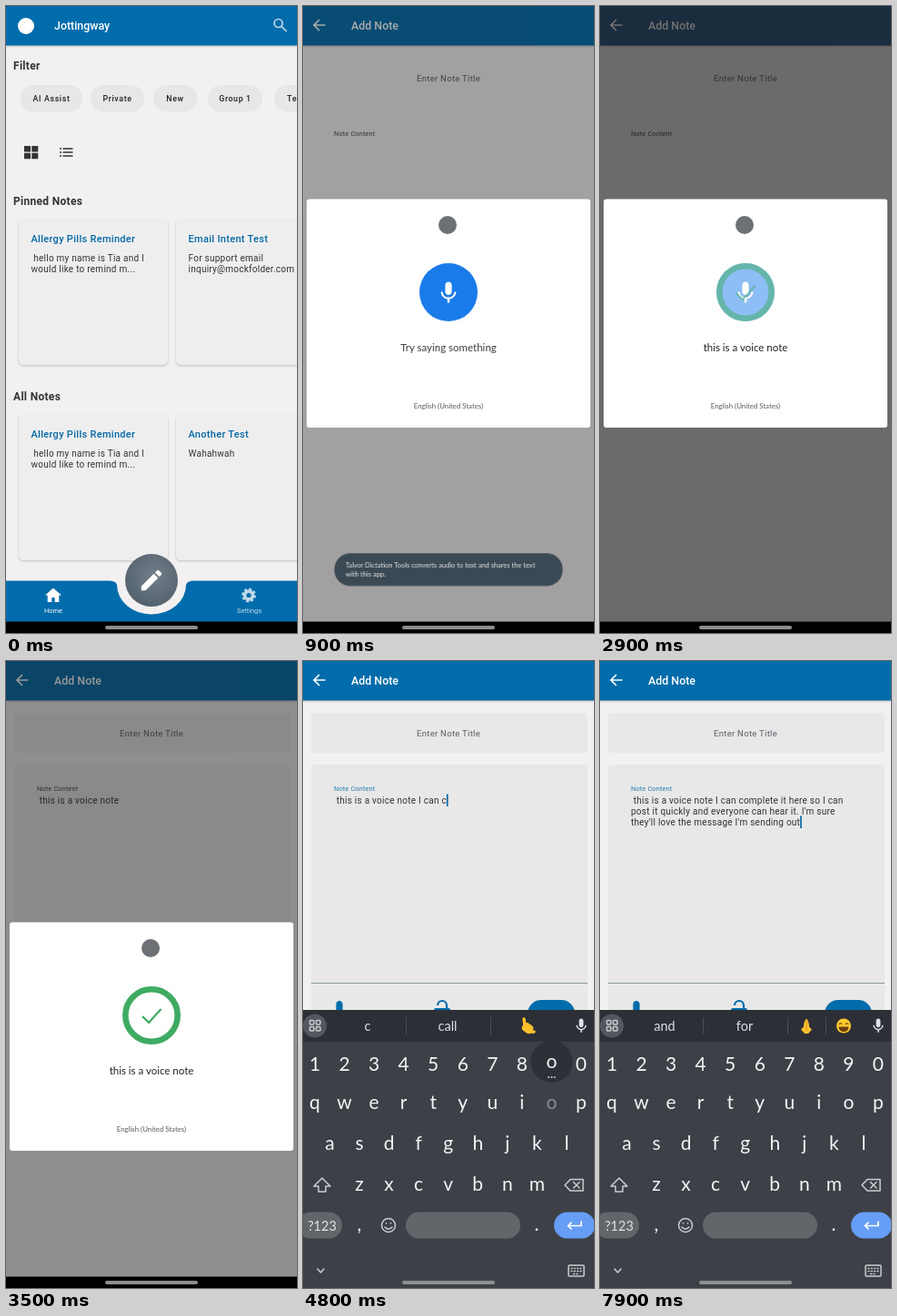
Recreate the animation shown at these times as an HTML page. Size 320x690 px, loop 8 s.

```html
<!DOCTYPE html>
<html lang="en">
<head>
<meta charset="utf-8">
<title>Voice note</title>
<style>
html, body { margin: 0; width: 100%; height: 100%; overflow: hidden; background: #000; }
svg { display: block; width: 100vw; height: 100vh; font-family: Roboto, sans-serif; }
text { white-space: pre; }
.mid { text-anchor: middle; }
.top { fill: #016cab; filter: drop-shadow(0 1px 1px rgba(0,0,0,.2)); }
.bar { font-size: 12.4px; font-weight: 500; fill: #fff; }
.head { font-size: 12px; font-weight: 700; letter-spacing: .3px; fill: #333; }
.chip { font-size: 8.8px; font-weight: 500; letter-spacing: .65px; fill: #222; text-anchor: middle; }
.name { font-size: 11px; font-weight: 500; letter-spacing: .3px; fill: #0569a8; }
.body { font-size: 10px; letter-spacing: .25px; fill: #333; }
.tab { font-size: 7.4px; fill: #fff; text-anchor: middle; }
.tile { fill: #eee; filter: drop-shadow(0 1.5px 1px rgba(0,0,0,.22)); }
.lato { font-family: Lato, "Open Sans", sans-serif; }
.key { font: 21px Lato, sans-serif; fill: #f4f5f6; text-anchor: middle; }
.hint { font: 14.5px Lato, sans-serif; fill: #dfe1e5; text-anchor: middle; }
.line { fill: none; stroke: #c9ccd0; stroke-width: 1.5; stroke-linecap: round; stroke-linejoin: round; }

#add, #addTop, #dim, #dialog, #dialogBox, #halo, #micDisc, #done, #toast, #keys, #label, .card {
  animation: 8s linear infinite both;
}
#halo, #toast { transform-box: fill-box; transform-origin: center; }
#add { animation-name: add; }
#addTop { animation-name: shade; }
#dim { animation-name: dim; }
#dialog { animation-name: drop; animation-timing-function: step-end; }
#dialogBox { animation-name: show; }
#halo { animation-name: halo; }
#micDisc { animation-name: micOut; }
#done { animation-name: doneIn; }
#toast { animation-name: toast; }
#keys { animation-name: keys; }
#label { animation-name: focus; }
.card { animation-name: card; }
@keyframes add { 0%, 1.25% { opacity: 0 } 5%, 100% { opacity: 1 } }
@keyframes shade { 0%, 11.25% { fill: #016cab } 14%, 42.5% { fill: #21527e } 43.75%, 100% { fill: #016cab } }
@keyframes dim {
  0%, 7.5% { opacity: 0 } 11.25% { opacity: .36 } 14%, 42.5% { opacity: .61 }
  43.75% { opacity: .445 } 47%, 100% { opacity: 0 }
}
@keyframes drop {
  0% { transform: none } 42.5% { transform: translateY(19px) }
  43.75% { transform: translateY(75px) } 45% { transform: translateY(220px) }
  46.25%, 100% { transform: translateY(480px) }
}
@keyframes show { 0%, 7.5% { opacity: 0 } 10%, 46.5% { opacity: 1 } 46.6%, 100% { opacity: 0 } }
@keyframes halo {
  0%, 17.5% { transform: scale(.9); animation-timing-function: ease-out }
  21.25%, 28.7% { transform: scale(1.5) } 28.75% { transform: scale(1.36) }
  32.5%, 100% { transform: scale(.9) }
}
@keyframes micOut { 0%, 35% { opacity: 1 } 37.5%, 100% { opacity: 0 } }
@keyframes doneIn { 0%, 35% { opacity: 0 } 37.5%, 100% { opacity: 1 } }
@keyframes toast {
  0%, 9.5% { opacity: 0; transform: scale(.95) } 11.25% { opacity: .75; transform: scale(.985) }
  12.5%, 32.5% { opacity: 1; transform: none } 36.25%, 100% { opacity: 0; transform: none }
}
@keyframes keys {
  0%, 48.1% { transform: translateY(306px); animation-timing-function: ease-out }
  51.9%, 100% { transform: none }
}
@keyframes focus { 0%, 47.5% { fill: #444 } 47.6%, 100% { fill: #2b7db3 } }
@keyframes card { 0%, 42.4% { opacity: 0 } 42.5%, 100% { opacity: 1 } }
</style>
</head>
<body>
<svg viewBox="0 0 320 690" preserveAspectRatio="none">
<defs>
  <path id="mic" d="M12 14c1.66 0 3-1.34 3-3V5c0-1.66-1.34-3-3-3S9 3.34 9 5v6c0 1.66 1.34 3 3 3zm5.3-3c0 3-2.54 5.1-5.3 5.1S6.7 14 6.7 11H5c0 3.41 2.72 6.23 6 6.72V21h2v-3.28c3.28-.48 6-3.3 6-6.72h-1.7z"/>
  <radialGradient id="press" cx=".55" cy=".4" r=".65">
    <stop stop-color="#717e8a"/><stop offset="1" stop-color="#52606c"/>
  </radialGradient>
</defs>

<g id="home">
  <path fill="#f2f0f0" d="M0 0h320v690H0z"/>
  <path class="top" d="M0 0h320v43.500H0z"/>
  <circle cx="22" cy="22" r="9" fill="#fff"/>
  <text class="bar" x="53" y="26">Jottingway</text>
  <path fill="none" stroke="#c4d9e8" stroke-width="1.7" d="M304 19a4.500 4.500 0 1 0-9 0a4.500 4.500 0 1 0 9 0M303 22.500l5.500 5.500"/>
  <text class="head" x="8" y="70">Filter</text>
  <g id="chips"></g>
  <path fill="#333" d="M20 154h7v6.500h-7zM28.300 154h7v6.500h-7zM20 161.800h7v6.500h-7zM28.300 161.800h7v6.500h-7z"/>
  <path fill="none" stroke="#333" stroke-width="1.700" d="M59 157h2m1.500 0h11M59 161h2m1.500 0h11M59 165h2m1.500 0h11"/>
  <text class="head" x="8" y="219">Pinned Notes</text>
  <text class="head" x="8" y="434">All Notes</text>
  <g id="tiles"></g>
  <path fill="#016cab" d="M0 632.500H113Q121 632.500 122 637A38 32.500 0 0 0 198 637Q199 632.500 207 632.500H320V678H0z"/>
  <circle cx="160" cy="632" r="29" fill="url(#press)"/>
  <path fill="#fff" transform="translate(145 617) scale(1.25)" d="M3 17.250V21h3.750L17.810 9.940l-3.750-3.750zM20.710 7.040a1 1 0 0 0 0-1.410l-2.340-2.340a1 1 0 0 0-1.410 0l-1.830 1.830 3.750 3.750z"/>
  <path fill="#fff" d="M52 640.500l9 8h-2.700v7.500h-4.600v-5h-3.400v5h-4.600v-7.500H43z"/>
  <text class="tab" x="52" y="668">Home</text>
  <g opacity=".75">
    <g fill="none" stroke="#fff">
      <circle cx="267" cy="648.500" r="4.400" stroke-width="3.600"/>
      <circle cx="267" cy="648.500" r="6.600" stroke-width="2.600" stroke-dasharray="2.800 2.384"/>
    </g>
    <text class="tab" x="267.500" y="668">Settings</text>
  </g>
</g>

<g id="add">
  <path fill="#f2f0f0" d="M0 0h320v690H0z"/>
  <path id="addTop" class="top" d="M0 0h320v43.500H0z"/>
  <path fill="none" stroke="#fff" stroke-width="1.700" d="M24.500 21H12.500M18 15l-6 6 6 6"/>
  <text class="bar" x="53" y="26">Add Note</text>
  <g class="card" fill="#e8e8e8">
    <rect x="9" y="57" width="304" height="44" rx="4"/>
    <rect x="9" y="114" width="304" height="314" rx="4"/>
  </g>
  <text class="mid" x="160" y="83" font-size="9.600" letter-spacing=".25" fill="#5a6066">Enter Note Title</text>
  <text id="label" x="34" y="143" font-size="7.400" letter-spacing=".15">Note Content</text>
  <text class="body" x="34" y="157"></text>
  <text class="body" x="34" y="169"></text>
  <text class="body" x="34" y="181"></text>
  <rect id="caret" width="1.700" height="13.500" fill="#0569a8"/>
  <path stroke="#8b989f" d="M9 354.500h304"/>
  <g fill="#016cab">
    <use href="#mic" transform="translate(25.600 371.600) scale(1.2)"/>
    <rect x="247" y="373" width="52" height="30" rx="15"/>
    <rect x="144" y="382" width="18" height="14" rx="2"/>
  </g>
  <path fill="none" stroke="#016cab" stroke-width="2.200" d="M148 379a5 5 0 0 1 10 0v4"/>
</g>

<path id="dim" fill="#161616" d="M0 0h320v678H0z"/>

<g id="toast">
  <rect x="32.500" y="602" width="255" height="36.500" rx="18" fill="#182d3b"/>
  <g class="lato" font-size="7.600" fill="#fff">
    <text x="45" y="618.500">Talvor Dictation Tools converts audio to text and shares the text</text>
    <text x="45" y="628.500">with this app.</text>
  </g>
</g>

<g id="dialog"><g id="dialogBox">
  <rect x="4" y="212.500" width="312" height="251.500" rx="3" fill="#fff"/>
  <circle cx="159" cy="241" r="10" fill="#6d7176"/>
  <g id="micDisc">
    <circle id="halo" cx="160" cy="315" r="32" fill="#e3eefc"/>
    <circle cx="160" cy="315" r="32" fill="#1a7bea"/>
    <use href="#mic" fill="#fff" transform="translate(145.600 301.200) scale(1.2)"/>
  </g>
  <g id="done" fill="none" stroke="#3fab62">
    <circle cx="160" cy="315" r="28.700" stroke-width="6.600"/>
    <path stroke-width="2.200" d="M150 316l7 7 13.500-15"/>
  </g>
  <text id="heard" class="lato mid" x="160" y="380" font-size="11.500"></text>
  <text class="lato mid" x="160" y="442.500" font-size="7.800" fill="#55595e">English (United States)</text>
</g></g>

<path d="M0 677.500h320v12.500H0z"/>

<g id="keys">
  <path fill="#3d4147" d="M0 384h320v306H0z"/>
  <path fill="#2c2f36" d="M0 384h320v35H0z"/>
  <circle cx="13" cy="401.500" r="13" fill="#54575d"/>
  <g class="line" stroke-width="1.300">
    <rect x="7.500" y="395.500" width="4.500" height="4.500" rx="1"/><rect x="14.500" y="395.500" width="4.500" height="4.500" rx="1"/>
    <rect x="7.500" y="402.500" width="4.500" height="4.500" rx="1"/><rect x="14.500" y="402.500" width="4.500" height="4.500" rx="1"/>
  </g>
  <path stroke="#4a4e55" d="M113.500 392v19M206.500 392v19"/>
  <use href="#mic" fill="#dfe1e5" transform="translate(296.400 392) scale(.8)"/>
  <text class="hint" x="71" y="407"></text>
  <text class="hint" x="159" y="407"></text>
  <text class="hint" x="247" y="407"></text>
  <g id="callHand" fill="#fbc02d">
    <rect x="241" y="399" width="12" height="10" rx="4" transform="rotate(35 247 404)"/>
    <path stroke="#fbc02d" stroke-width="3.400" stroke-linecap="round" d="M244 402l-1-8M250 408l4 0"/>
  </g>
  <g id="faces">
    <path stroke="#4a4e55" d="M248.500 392v19"/>
    <path fill="#fbc02d" d="M227 393.500q3 3 3 9l3 3-4 4.500h-4l-4-4.500 3-3q0-6 3-9z"/>
    <path stroke="#d98e12" d="M227 396v11"/>
    <circle cx="268" cy="401.500" r="8" fill="#fdc92f"/>
    <path fill="#6b3d10" d="M262.500 402.500h11a5.500 5.500 0 0 1-11 0z"/>
    <path fill="none" stroke="#6b3d10" stroke-width="1.200" d="M263 400q1.500-3 3 0M270 400q1.500-3 3 0"/>
  </g>
  <g id="letters"></g>
  <path class="line" d="M21 569l-9 9h5v6h8v-6h5zM294 570.500h14v12.500h-14l-6-6.250zM297.500 573.500l6.500 6.500m0-6.500l-6.500 6.500"/>
  <g fill="#62666a">
    <rect x="-6" y="606.500" width="49" height="29" rx="14.500"/>
    <rect x="113" y="606.500" width="126" height="29" rx="14.500"/>
  </g>
  <rect x="276" y="606.500" width="45" height="29" rx="14.500" fill="#669df5"/>
  <path fill="none" stroke="#fff" stroke-width="1.700" d="M306 616.500v5h-14.500M295.500 617.500l-4 4 4 4"/>
  <text class="hint" x="21" y="626.500">?123</text>
  <text class="key" x="62" y="627">,</text>
  <text class="key" x="257" y="627">.</text>
  <g class="line">
    <circle cx="94" cy="621" r="7.500"/>
    <path d="M91.500 618.500v.5M96.500 618.500v.5M90 623q4 4 8 0M16 669l3.500 4 3.500-4"/>
    <rect x="292" y="665" width="17" height="12" rx="1"/>
    <path d="M295 668.500h11M295 671.500h11M297.500 674.500h6" stroke-dasharray="1 2.300"/>
  </g>
  <g id="popup">
    <circle r="23" fill="#2d3036"/>
    <text class="key" y="7"></text>
    <path stroke="#e8eaed" stroke-width="1.700" stroke-dasharray="1.700 1.500" d="M-4 17h9"/>
  </g>
</g>
<rect x="109" y="682" width="102" height="4" rx="2" fill="#8d8f91"/>
</svg>

<script>
const $ = id => document.getElementById(id);
const LOOP = 8000;

function add(parent, tag, attrs, text = '') {
  const el = document.createElementNS('http://www.w3.org/2000/svg', tag);
  for (const k in attrs) el.setAttribute(k, attrs[k]);
  el.textContent = text;
  parent.append(el);
  return el;
}

[['AI Assist', 16, 68], ['Private', 93, 59], ['New', 162, 48], ['Group 1', 222, 60], ['Test', 295, 48]]
  .forEach(([label, x, width]) => {
    add($('chips'), 'rect', { x, y: 87, width, height: 29.5, rx: 14.5, fill: '#e7e7e7' });
    add($('chips'), 'text', { x: x + width / 2, y: 105, class: 'chip' }, label);
  });

const pills = ['Allergy Pills Reminder', ' hello my name is Tia and I', 'would like to remind m...'];
[[14, 235, pills], [187, 235, ['Email Intent Test', 'For support email', 'inquiry@mockfolder.com']],
 [14, 450, pills], [187, 450, ['Another Test', 'Wahahwah']]]
  .forEach(([x, y, [title, ...lines]]) => {
    add($('tiles'), 'rect', { x, y, width: 164, height: 160, rx: 5, class: 'tile' });
    add($('tiles'), 'text', { x: x + 13.5, y: y + 25, class: 'name' }, title);
    lines.forEach((s, i) =>
      add($('tiles'), 'text', { x: x + 13.5, y: y + 45.5 + 12 * i, class: 'body' }, s));
  });

const keyAt = {};
[['1234567890', 13, 444], ['qwertyuiop', 13, 486], ['asdfghjkl', 29.5, 531], ['zxcvbnm', 62, 576]]
  .forEach(([row, x0, cy]) => [...row].forEach((c, i) => {
    const x = x0 + 32.55 * i;
    keyAt[c] = { x, y: cy - 45, el: add($('letters'), 'text', { x, y: cy + 7, class: 'key' }, c) };
  }));

const lines = document.querySelectorAll('#add .body');
const hints = document.querySelectorAll('#keys .hint');
const popup = $('popup');

// Last entry whose time has passed
const at = (list, t) => list.filter(e => e[0] <= t).pop();

const heard = [
  [0, 'Try saying something', '#3c4043'], [1400, '', '#999'], [2100, 'this', '#9a9da1'],
  [2300, 'this is a', '#9a9da1'], [2500, 'this is a voice', '#9a9da1'],
  [2700, 'this is a voice note', '#9a9da1'], [2900, 'this is a voice note', '#222528']
];
const guesses = [
  [0, 'I', 'the', 'and'], [4400, 'can', 'am', 'will'], [4800, 'c', 'call', ''],
  [4900, 'come', 'complete', 'comes'], [5500, 'it', 'the', 'and'],
  [5800, 'he', 'here', 'her'], [5900, 'her', 'here', 'herself'],
  [6100, 'and', 'so', 'for'], [6600, 'and', 'for', 'so'], [7600, 'and', 'for', '']
];
const spoken = ' this is a voice note';
const typed = ' I can complete it here ';
const full = [' this is a voice note I can complete it here so I can',
  'post it quickly and everyone can hear it. I\'m sure',
  'they\'ll love the message I\'m sending out'];

// Moment the nth typed character lands
const landing = n => 4855 + (n - 9) * 79.615;

function noteAt(t) {
  if (t < 3400) return ['', '', ''];
  if (t >= 7600) return full;
  let n = 0;
  while (n < typed.length && landing(n + 1) <= t) n++;
  return [spoken + typed.slice(0, n), '', ''];
}

function showPopup(t) {
  let hit = 0;
  for (let n = 1; n <= typed.length; n++) {
    const key = keyAt[typed[n - 1].toLowerCase()];
    if (!key) continue;
    key.el.style.opacity = 1;
    if (t >= landing(n) - 60 && t <= landing(n) + 40) hit = n;
  }
  popup.style.display = hit ? '' : 'none';
  if (!hit) return;
  const c = typed[hit - 1], key = keyAt[c.toLowerCase()], pending = t < landing(hit);
  popup.setAttribute('transform', `translate(${key.x} ${key.y})`);
  popup.children[1].textContent = c;
  popup.children[2].style.display = pending ? '' : 'none';
  if (pending) key.el.style.opacity = .4;
}

function render(t) {
  const [, words, color] = at(heard, t);
  $('heard').textContent = words;
  $('heard').style.fill = color;

  const note = noteAt(t);
  lines.forEach((el, i) => el.textContent = note[i]);
  const row = note[2] ? 2 : 0;
  const blinkOff = (t >= 6600 && t < 7000) || (t >= 7300 && t < 7600);
  $('caret').setAttribute('x', 34 + lines[row].getComputedTextLength());
  $('caret').setAttribute('y', 146.5 + 12 * row);
  $('caret').style.display = t >= 4000 && !blinkOff ? '' : 'none';

  const guess = at(guesses, t);
  hints.forEach((el, i) => { if (i < 3) el.textContent = guess[i + 1]; });
  hints[1].style.fontWeight = guess[2] === 'here' ? 700 : 400;
  $('callHand').style.display = guess[2] === 'call' ? '' : 'none';
  $('faces').style.display = t >= 7600 ? '' : 'none';
  showPopup(t);
}

let start;
function tick(now) {
  start ??= now;
  // Typing and speech advance ten times a second
  render(Math.floor((now - start) % LOOP / 100) * 100);
  requestAnimationFrame(tick);
}
render(0);
requestAnimationFrame(tick);
</script>
</body>
</html>
```
